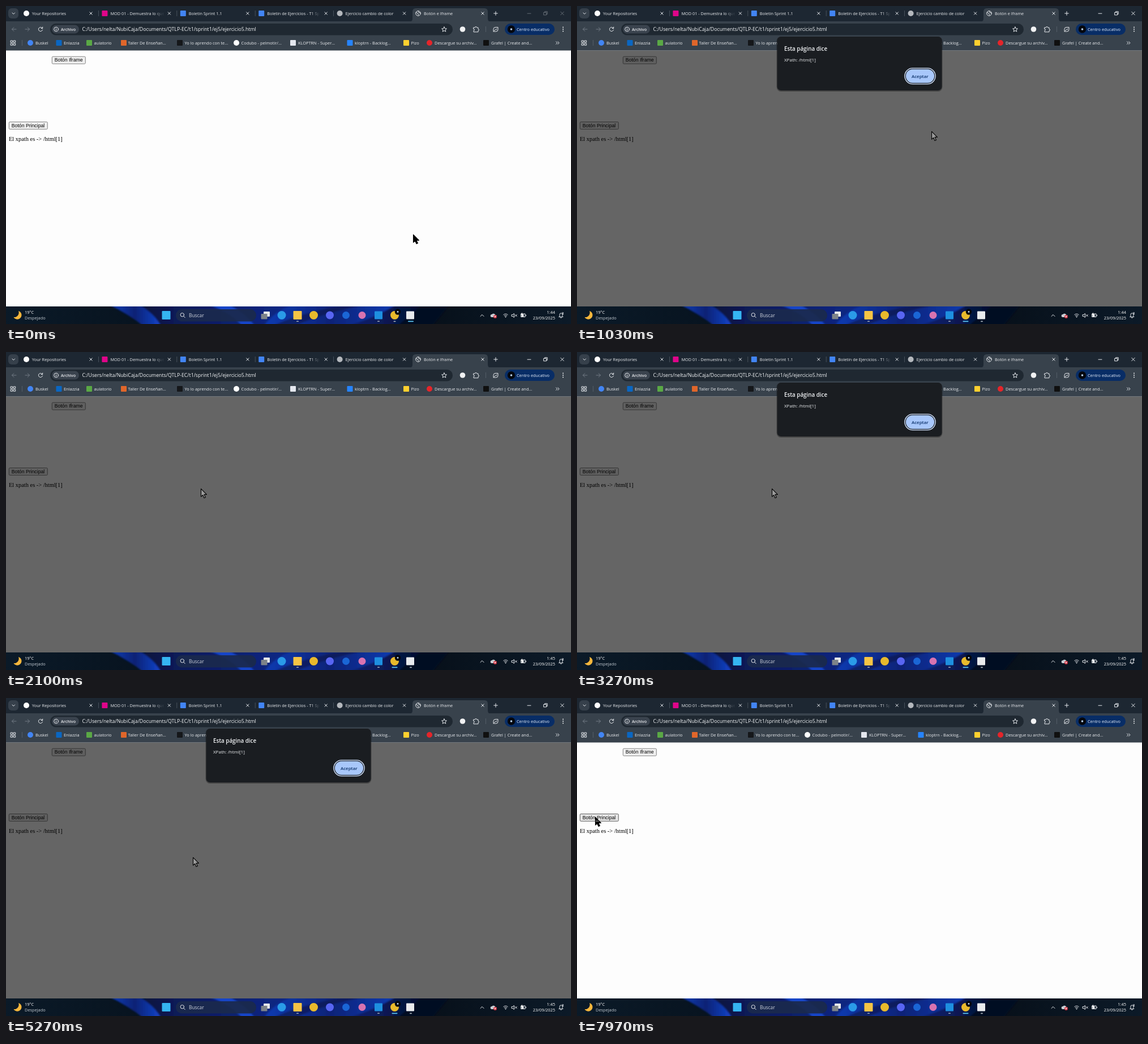
Animation, 998 px wide and 561 px high, one loop 8 s. Source, as an HTML page:

```html
<!DOCTYPE html>
<html lang="es">
<head>
<meta charset="utf-8">
<title>Botón e Iframe</title>
<style>
  html, body { margin: 0; width: 100%; height: 100%; overflow: hidden; background: #fdfdfd; }
  svg { display: block; width: 998px; height: 561px; font-family: "Open Sans", "Noto Sans", sans-serif; }
  text { white-space: pre; }
  .page { font-family: "Liberation Sans", Arial, sans-serif; }
  .serif { font-family: "Liberation Serif", serif; }
  .line { fill: none; stroke: #e6e9ed; stroke-width: 1; stroke-linecap: round; stroke-linejoin: round; }
  #fill { fill: #fff; mix-blend-mode: difference; }
  #edge { fill: none; stroke: #000; stroke-width: 1.1; stroke-linejoin: round; }
</style>
</head>
<body>
<svg id="stage" viewBox="0 0 998 561"></svg>
<script>
const STRIP = '#1d2732', BAR = '#38424c', BOX = '#1f2831', LIGHT = '#eaecef';

const rect = (x, y, w, h, fill, r = 0, extra = '') =>
  `<rect x="${x}" y="${y}" width="${w}" height="${h}" rx="${r}" fill="${fill}" ${extra}/>`;
const disc = (x, y, r, fill, extra = '') => `<circle cx="${x}" cy="${y}" r="${r}" fill="${fill}" ${extra}/>`;
const square = (x, y, size, fill, r = 1) => rect(x - size / 2, y - size / 2, size, size, fill, r);
const line = (d, extra = '') => `<path class="line" d="${d}" ${extra}/>`;
const shape = (d, fill, extra = '') => `<path d="${d}" fill="${fill}" ${extra}/>`;
const text = (x, y, size, str, fill = LIGHT, extra = '') =>
  `<text x="${x}" y="${y}" font-size="${size}" fill="${fill}" ${extra}>${str}</text>`;
const cross = (x, y, r, extra) => line(`M${x - r} ${y - r}l${2 * r} ${2 * r}m0 ${-2 * r}l${-2 * r} ${2 * r}`, extra);
const mark = (kind, x, y, size, fill) => kind === 'o' ? disc(x, y, size / 2, fill) : square(x, y, size, fill);

const gradient = (id, ...colors) => `<linearGradient id="${id}">`
  + colors.map((c, i) => `<stop offset="${i / (colors.length - 1)}" stop-color="${c}"/>`).join('') + '</linearGradient>';
const defs = '<defs>'
  + gradient('fade', STRIP + '00', STRIP)
  + gradient('task', '#0b1a28', '#07131f', '#060c16', '#07101a', '#0c1a28')
  + gradient('bloom', '#040a1c', '#081a58', '#0a2274', '#0a2a90', '#071a58', '#03060f')
  + gradient('ribbon', '#1340c0', '#0a2274', '#1444cc')
  + '<filter id="soft"><feGaussianBlur stdDeviation="1.6"/></filter>'
  + '<clipPath id="bar"><rect x="0" y="530" width="998" height="31"/></clipPath></defs>';

function tabs() {
  const list = [
    ['o', '#fff', 'Your Repositories'],
    ['s', '#e0058a', 'MOD 01 - Demuestra lo que'],
    ['s', '#4285f4', 'Boletín Sprint 1.1'],
    ['s', '#4285f4', 'Boletín de Ejercicios - T1 Sp'],
    ['o', '#b4b8bd', 'Ejercicio cambio de color'],
    ['', '', 'Botón e Iframe'],
  ];
  let out = rect(0, 0, 998, 28, STRIP) + rect(4, 4, 18, 18, '#36404b', 6) + line('M11 12l2.3 2.3l2.3 -2.3')
    + shape('M712 28q6 0 6 -6v-12q0 -6 6 -6h121q6 0 6 6v12q0 6 6 6z', BAR);
  list.forEach(([kind, color, title], i) => {
    const x = 36 + i * 138.4;
    if (kind) out += mark(kind, x, 13, 10, color);
    out += text(x + 10, 16, 7.35, title);
    if (i === 1 || i === 3) out += rect(x + 88, 5, 15, 17, 'url(#fade)') + rect(x + 103, 5, 6, 17, STRIP);
    out += cross(x + 114, 13, 2.2);
    if (i < 4) out += rect(x + 127, 8, .8, 10, '#525b66');
  });
  out += disc(728, 13, 4.3, 'none', 'class="line"')
    + line('M724.5 11.5l3 1.5l1 3M728 9l1 2.5l3 .5', 'stroke-width="1.4"');
  out += line('M861.7 13h6.6M865 9.7v6.6', 'stroke-width="1.2"');
  return out + `<g id="controls">${line('M921 13.2h6')}${line('M950 11.3h4.6v4.6h-4.6zM951.6 11v-1.2h4.6v4.6h-1.2')}${cross(982.5, 13, 2.8)}</g>`;
}

function toolbar() {
  const path = 'C:/Users/nelta/NubiCaja/Documents/QTLP-EC/t1/sprint1/ej5/ejercicio5.html';
  return rect(0, 27, 998, 51.5, BAR)
    + line('M18 41h-7.5m3.3 -3.3l-3.3 3.3l3.3 3.3M34 41h7.5m-3.3 -3.3l3.3 3.3l-3.3 3.3', 'style="stroke:#727b85"')
    + line('M64 39a3.6 3.6 0 1 0 .5 3M64.7 37v2.5h-2.6', 'stroke-width="1.2"')
    + rect(78, 31, 711, 20.5, BOX, 10) + rect(81, 33.5, 48, 15, '#3a434e', 7.5)
    + disc(88.5, 41, 3.8, 'none', 'class="line"') + line('M88.5 40.7v2.2M88.5 39v.1')
    + text(97, 44, 7.2, 'Archivo', LIGHT, 'font-weight="600"')
    + text(134.5, 44.4, 8.75, path, '#f4f6f8')
    + line('M774 36.8l1.3 2.9l3.1 .3l-2.4 2.1l.8 3.1l-2.8 -1.7l-2.8 1.7l.8 -3.1l-2.4 -2.1l3.1 -.3z')
    + disc(806.5, 41, 4.8, '#f1f2f3')
    + line('M826 38h2.5a1.5 1.5 0 1 1 3 0h2.5v2.7a1.4 1.4 0 1 1 0 2.8v2.3h-8v-2.5a1.4 1.4 0 1 0 0 -2.8z')
    + rect(847, 36, .8, 10, '#5b6570')
    + line('M861 44.5v-4q0 -3 4 -3h4v4q0 3.5 -3.5 3.5h-2.5zM861 45l4 -4m2 -1l-1 2')
    + rect(881, 31, 88, 20, '#082d66', 10) + disc(892.5, 41, 6.7, '#05070d') + disc(892.5, 41, 1.8, '#b9d4f5')
    + text(902, 44, 7.3, 'Centro educativo', '#e6effb')
    + [37.5, 41, 44.5].map(y => disc(984, y, 1, LIGHT)).join('');
}

function bookmarks() {
  const list = [
    [43, 52, 'o', '#4285f4', 'Buskel'],
    [93.5, 102, 's', '#0a66c2', 'Enlazzia'],
    [147, 155.5, 's', '#5aa845', 'aulatorio'],
    [208, 215.5, 's', '#e0662a', 'Taller De Enseñan...'],
    [307, 315.5, 's', '#15171a', 'Yo lo aprendo con te...'],
    [407, 415.5, 'o', '#fff', 'Codubo - pelmotir/...'],
    [507, 516, 's', '#e4e7ee', 'KLOPTRN - Super...'],
    [607.5, 616, 's', '#2684ff', 'kloptrn - Backlog...'],
    [707, 715.5, 's', '#ffd02f', 'Pizo'],
    [748, 757, 'o', '#e5252a', 'Descargue su archiv...'],
    [848, 857, 's', '#101010', 'Grafel | Create and...'],
  ];
  let out = rect(28, 60, .8, 10, '#5b6570');
  for (const x of [8.5, 13.5]) for (const y of [61, 66]) out += rect(x, y, 3.2, 3.2, 'none', 0, 'class="line"');
  for (const [x, tx, kind, color, label] of list) out += mark(kind, x, 65, 10, color) + text(tx, 67.6, 7.4, label);
  return out + line('M971.5 62.8l2.3 2.3l-2.3 2.3m3.2 -4.6l2.3 2.3l-2.3 2.3');
}

const button = (id, x, y, w, label) =>
  rect(x + .5, y + .5, w, 12.8, '#efefef', 1.6, `id="${id}" stroke="#767676" stroke-width=".9"`)
  + text(x + 5, y + 9.6, 8.7, label, '#000', 'class="page"');

const page = () => rect(0, 78.5, 998, 452, '#fdfdfd')
  + button('iframeButton', 80.8, 88.7, 59, 'Botón Iframe')
  + button('mainButton', 4.8, 204, 68, 'Botón Principal')
  + text(5, 237.6, 10.4, 'El xpath es -&gt; /html[1]', '#000', 'class="serif"')
  + rect(0, 78.5, 998, 451.5, '#000', 0, 'id="shade" opacity=".6"');

const dialog = () => `<g id="dialog">`
  + rect(352.5, 54, 293, 97, '#000', 8, 'opacity=".3"')
  + rect(353.5, 54, 291, 95, '#1a1d21', 7)
  + text(366, 79, 9.8, 'Esta página dice', '#f2f4f6', 'font-weight="600"')
  + text(366, 97.6, 8, 'XPath: /html[1]', '#eceef0')
  + rect(578.9, 109.6, 54.2, 28, 'none', 14, 'stroke="#d3e3fd" stroke-width="1.4"')
  + rect(580.8, 111.5, 50.4, 24.2, '#a8c7fa', 12.1)
  + text(591, 126.6, 7.9, 'Aceptar', '#0a3069', 'font-weight="600"') + `</g>`;

function taskbar() {
  const icons = [
    ['s', 283, 15, '#35b5f2'], ['o', 487, 15, '#2a9be8'], ['s', 515, 15, '#f5c445'], ['o', 543.5, 15, '#e8b92c'],
    ['o', 572, 14, '#5865f2'], ['o', 600.5, 13, '#1a66d6'], ['o', 629, 13, '#d873b0'],
    ['s', 658, 14, '#1e8fe0'], ['o', 686.5, 15, '#e8b92c'], ['s', 714, 14, '#e9ebee'],
  ];
  const wallpaper = '<g clip-path="url(#bar)"><g filter="url(#soft)">'
    + shape('M180 526H784L752 565H246Q215 545 180 526z', 'url(#bloom)')
    + shape('M181 526H233Q262 542 274 565H243Q218 544 181 526z', 'url(#ribbon)')
    + shape('M356 526H392Q424 543 440 565H418Q396 540 356 526z', '#1444c8')
    + shape('M455 565Q474 538 510 526H690Q650 552 598 565z', 'url(#ribbon)', 'opacity=".8"')
    + shape('M470 565Q520 540 610 526H640Q560 542 508 565z', '#071648', 'opacity=".6"')
    + shape('M690 565Q712 548 736 526H784L752 565z', '#050c22') + '</g></g>';
  const tray = line('M838 547.5l3 -3l3 3', 'stroke-width="1.2"')
    + shape('M858 549a2.5 2.5 0 0 1 .3 -5a3.5 3.5 0 0 1 6 1a2 2 0 0 1 .5 4z', '#c9ced4') + disc(864, 548, 2.9, '#d9303e')
    + cross(864, 548, 1)
    + line('M878.8 544.6q3.7 -3 7.4 0M880.3 546.5q2.2 -1.8 4.4 0') + disc(882.5, 548.6, 1, LIGHT)
    + line('M893.5 544.5h1.6l2.3 -2v7l-2.3 -2h-1.6zM899.3 544.5l3 3m0 -3l-3 3')
    + line('M910 543h7v5.5h-7zM918.5 545v1.7') + rect(910.5, 544, 4, 4, LIGHT)
    + shape('M911.5 540.5l-2 4h2l-.8 3.2l3.3 -4.5h-2z', '#fff')
    + line('M977 548.5h6.8l-1 -1.7v-2.5a2.4 2.4 0 0 0 -4.8 0v2.5zM979.5 550h1.8M982.5 541h2.2l-2.2 2.6h2.2');
  return rect(0, 530, 998, 31, 'url(#task)') + wallpaper
    + shape('M22 538a7.5 7.5 0 1 1 -8.5 11a8 8 0 0 0 8.5 -11z', '#f6b73c')
    + text(33, 543, 7.3, '19°C', '#fff') + text(33, 553, 7.4, 'Despejado', '#c3cad2')
    + rect(300, 535, 142, 21.5, '#1b2a4c', 10.7, 'opacity=".92"')
    + disc(311.3, 544.8, 3.2, 'none', 'class="line"') + line('M313.8 547.3l2.4 2.4')
    + text(323, 549, 8.4, 'Buscar', '#d0d5de')
    + rect(455, 539, 11, 9, '#e6e8ea', 1) + rect(450.5, 543, 11, 9.5, '#7d8389', 1)
    + icons.map(([kind, x, size, color]) => mark(kind, x, 545.5, size, color)).join('')
    + disc(692, 539.5, 5.2, '#05070d') + disc(692, 539.5, 1.4, '#b9d4f5')
    + [515, 658].map(x => rect(x - 2, 555.6, 4, 1.5, '#a3abb5', .7)).join('')
    + rect(0, 555.6, 4, 1.6, '', .8, 'id="browserDot"') + rect(0, 555.6, 4, 1.6, '', .8, 'id="captureDot"')
    + tray + text(970, 543, 7.4, '', '#fff', 'id="clock" text-anchor="end"')
    + text(970, 553, 7.4, '23/09/2025', '#fff', 'text-anchor="end"');
}

const arrow = 'M.5 .3V14.2L3.6 11.3L6 16.6L8.4 15.5L6 10.4H10.4Z';
const stage = document.getElementById('stage');
stage.innerHTML = defs + page() + tabs() + toolbar() + bookmarks() + dialog() + taskbar()
  + `<path id="fill" d="${arrow}"/><path id="edge" d="${arrow}"/>`;
const el = Object.fromEntries([...stage.querySelectorAll('[id]')].map(node => [node.id, node]));

const LOOP = 8000, ACTIVATED = 640, NEW_MINUTE = 1500;
// time, x, y of the pointer tip
const route = [
  [0, 719, 403], [80, 719, 403], [600, 626, 221], [1080, 626, 221], [1380, 611, 120], [1480, 611, 120],
  [1950, 344, 241], [3350, 344, 241], [3780, 611, 120], [3900, 611, 120], [4400, 330, 281], [5550, 330, 281],
  [6350, 611, 118], [6700, 611, 118], [7800, 32, 210], [LOOP, 32, 210],
];
// shade shown, dialog shown, both closed
const alerts = [[680, 790, 1460], [2050, 2180, 3870], [5120, 5240, 6660]];

function pointerAt(t) {
  const i = route.findIndex(step => step[0] > t);
  const [t0, x0, y0] = route[i - 1], [t1, x1, y1] = route[i];
  const p = (t - t0) / (t1 - t0), k = p * p * (3 - 2 * p);
  return [x0 + (x1 - x0) * k, y0 + (y1 - y0) * k];
}

const show = (node, on) => node.setAttribute('visibility', on ? 'visible' : 'hidden');

function dot(node, x, active) {
  const width = active ? 10 : 4;
  node.setAttribute('x', x - width / 2);
  node.setAttribute('width', width);
  node.setAttribute('fill', active ? '#5cc8f5' : '#a3abb5');
}

function draw(now) {
  const t = now % LOOP, [x, y] = pointerAt(t);
  const alert = alerts.find(([start, , end]) => t >= start && t < end);
  const focused = t >= ACTIVATED;
  show(el.shade, alert);
  show(el.dialog, alert && t >= alert[1]);
  el.controls.setAttribute('opacity', focused ? 1 : .35);
  dot(el.browserDot, 686.5, focused);
  dot(el.captureDot, 715, !focused);
  el.clock.textContent = t < NEW_MINUTE ? '1:44' : '1:45';
  const hover = !alert && x > 5 && x < 73 && y > 204 && y < 218;
  el.mainButton.setAttribute('fill', hover ? '#e5e5e5' : '#efefef');
  el.mainButton.setAttribute('stroke', hover ? '#4f4f4f' : '#767676');
  for (const part of [el.fill, el.edge]) part.setAttribute('transform', `translate(${x} ${y})`);
  requestAnimationFrame(() => draw(performance.now()));
}
draw(performance.now());
</script>
</body>
</html>
```
